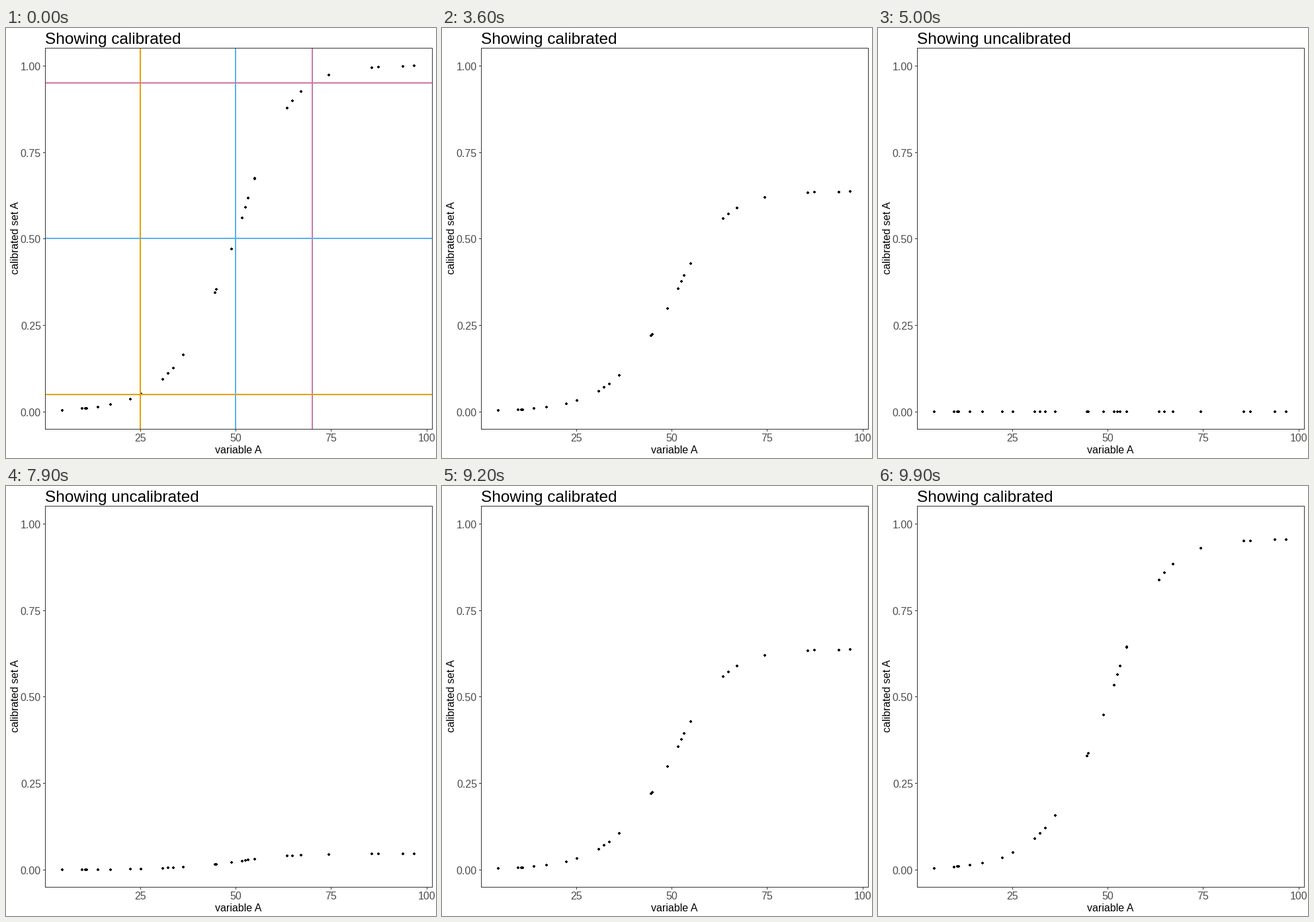
Recreate the animation shown at these times as a matplotlib script. Size 650 by 650 pixels, loop 10000 ms.

```python
import numpy as np
import matplotlib.pyplot as plt
from matplotlib.animation import FuncAnimation
from matplotlib.patches import Rectangle

SIZE, DPI = 650, 100
FRAMES, INTERVAL = 100, 100
STEPS = 22                      # length of one transition, in frames
LEAVE, RETURN = 29, 79          # first frame of each transition
PX = 72 / DPI                   # points per pixel
LEFT, RIGHT, TOP, BOTTOM = 59, 644, 30, 606

DARK, GREY = "#333333", "#4D4D4D"
ANCHORS = {25: "#E69F00", 50: "#56B4E9", 70: "#CC79A7"}

# The observed cases; everything else about the dots follows from them
CASES = np.array([
    4.55, 9.75, 10.55, 10.95, 13.85, 17.15, 22.3, 25.2, 30.8, 32.25,
    33.6, 36.2, 44.55, 44.85, 48.96, 51.62, 52.5, 53.25, 54.92, 54.94,
    63.4, 64.83, 67.1, 74.4, 85.6, 87.4, 93.8, 96.75])


def x_px(v):
    return np.floor(347.3 + (v - 50) * 5.767 + 0.5)


def y_px(v):
    return np.floor(580 - v * 523.2 + 0.5)


def calibrate(v):
    """Logistic membership: 0.05, 0.5 and 0.95 at the three anchors."""
    low, mid, high = ANCHORS
    span = np.where(v < mid, mid - low, high - mid)
    return 1 / (1 + np.exp(-(v - mid) * np.log(19) / span))


def level(frame):
    """Share of the calibrated height shown, falling and rising linearly."""
    fall = (frame - LEAVE + 1) / STEPS
    rise = (frame - RETURN + 1) / STEPS
    return 1 - np.clip(fall, 0, 1) + np.clip(rise, 0, 1)


fig = plt.figure(figsize=(SIZE / DPI, SIZE / DPI), dpi=DPI, facecolor="white")
ax = fig.add_axes([0, 0, 1, 1])
ax.axis("off")


def bar(x, y, w, h, color=DARK, z=4):
    return ax.add_patch(Rectangle((x, y), w, h, facecolor=color, linewidth=0,
                                  antialiased=False, zorder=z))


def label(x, y, text, size=16, color="black", ha="center", angle=0):
    return ax.text(x, y, text, fontsize=size * PX, color=color, ha=ha,
                   va="baseline", rotation=angle, rotation_mode="anchor",
                   family="Liberation Sans")


# Panel border
for y in (TOP, BOTTOM):
    bar(LEFT, y, RIGHT - LEFT + 1, 1)
for x in (LEFT, RIGHT):
    bar(x, TOP, 1, BOTTOM - TOP + 1)

# Ticks and labels
for v in np.linspace(0, 1, 5):
    y = y_px(v)
    bar(LEFT - 3, y, 3, 1)
    label(LEFT - 6, y + 7, f"{v:.2f}", color=GREY, ha="right")
for v in range(25, 101, 25):
    x = x_px(v)
    bar(x, BOTTOM + 1, 1, 3)
    label(x, BOTTOM + 19, str(v), color=GREY)

label(351, 643, "variable A")
label(19, 317, "calibrated set A", angle=90)
title = label(LEFT, 24, "", size=24.4, ha="left")

# One vertical and one horizontal line per anchor
guides = []
for v, color in ANCHORS.items():
    guides.append(bar(x_px(v) - 1, TOP + 1, 2, BOTTOM - TOP - 1, color, 3))
    guides.append(bar(LEFT + 1, y_px(calibrate(v)) - 1, RIGHT - LEFT - 1, 2,
                      color, 3.5))

# Dot outline: a four pixel square with cut corners, by quarter turns
turns = np.outer(1j ** np.arange(4), [2 - 1j, 2 + 1j, 1 + 1j]).ravel()
turns = np.append(turns, turns[0])
outline = np.round(np.column_stack([turns.real, turns.imag]))

xs, heights = x_px(CASES), calibrate(CASES)
dots = ax.scatter(xs, y_px(heights), s=(4 * PX) ** 2, marker=outline,
                  color="black", linewidths=0, zorder=2)
dots.set_antialiased(False)

ax.set_xlim(0, SIZE)
ax.set_ylim(SIZE, 0)


def draw(frame):
    dots.set_offsets(np.column_stack([xs, y_px(heights * level(frame))]))
    # The title switches halfway through each transition
    half = STEPS // 2
    plain = LEAVE + half <= frame < RETURN + half
    title.set_text("Showing " + ("uncalibrated" if plain else "calibrated"))
    for g in guides:
        g.set_visible(frame < LEAVE)
    return [dots, title, *guides]


anim = FuncAnimation(fig, draw, frames=FRAMES, interval=INTERVAL,
                     repeat=True, repeat_delay=0, blit=False)
plt.show()
```
